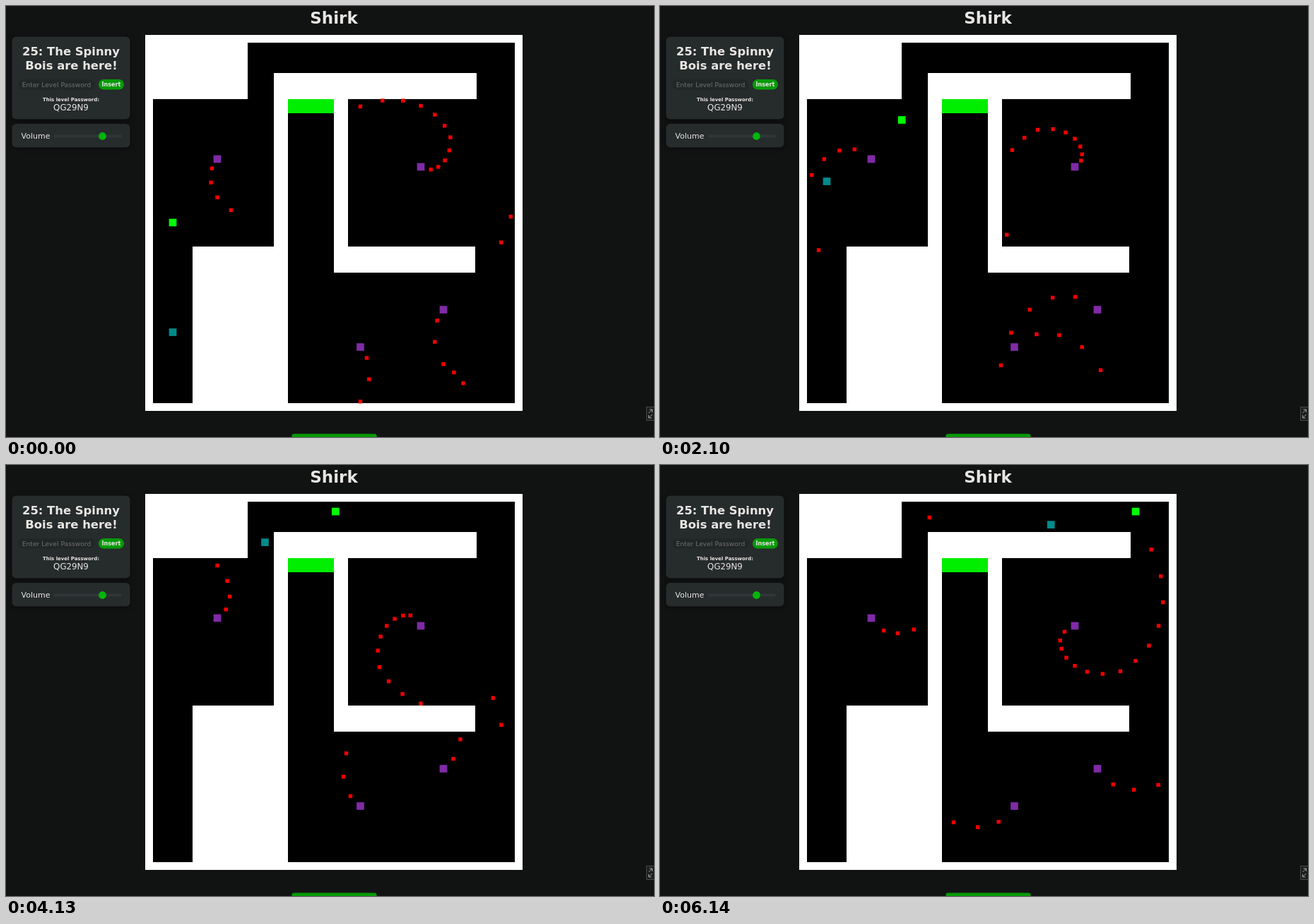
These frames come from a looping animation (917 px wide and 611 px high, 6.21 s). An HTML page with a canvas:

```html
<!DOCTYPE html>
<html lang="en">
<head>
<meta charset="utf-8">
<title>Shirk</title>
<style>
  html, body { margin: 0; width: 100%; height: 100%; overflow: hidden; background: #111313; }
  svg, canvas { position: absolute; left: 0; top: 0; }
  text { font-family: "DejaVu Sans", sans-serif; fill: #e8e6e3; text-anchor: middle; }
  .b { font-weight: bold; }
  .panel { fill: #262b2c; filter: drop-shadow(0 1px 3px #0008); }
</style>
</head>
<body>
<svg width="917" height="611">
  <text class="b" x="464" y="25" font-size="23">Shirk</text>

  <rect class="panel" x="8.5" y="43.5" width="167" height="117" rx="6"/>
  <text class="b" x="92" y="70" font-size="16.4">25: The Spinny</text>
  <text class="b" x="92.5" y="90" font-size="16.4">Bois are here!</text>
  <rect x="17" y="104" width="109" height="14.5" rx="7" fill="#212627"/>
  <text x="71.5" y="114.5" font-size="9.2" style="fill:#71716d">Enter Level Password</text>
  <rect x="131" y="104" width="36" height="14.5" rx="7.2" fill="#069a06"/>
  <text class="b" x="149" y="114.3" font-size="8.1">Insert</text>
  <text class="b" x="92" y="135" font-size="6.95">This level Password:</text>
  <text x="92" y="147.5" font-size="11.8">QG29N9</text>

  <rect class="panel" x="8.5" y="167" width="167" height="33.5" rx="6"/>
  <text x="42" y="188" font-size="11">Volume</text>
  <rect x="67" y="182.5" width="97" height="4" rx="2" fill="#303637"/>
  <circle cx="136.5" cy="184.5" r="5.4" fill="#00b50a"/>

  <rect x="404.5" y="606.5" width="120" height="12" rx="3" fill="#069a06"/>
  <rect x="906.5" y="568.5" width="14" height="19" fill="#1b1d1d" stroke="#4a4d4d"/>
  <path d="M914.5 576v-4h-4m4 0l-5 5M909.500 580v4h4m-4 0l5-5" fill="none" stroke="#a5a5a2"/>
</svg>
<canvas id="stage" width="917" height="611"></canvas>
<script>
const ctx = document.getElementById('stage').getContext('2d');
const STEP = 70, LOOP = 6210, LAST = 6140, LAST_TICK = 88;

// Distances in pixels, times in ticks, speeds in pixels per tick
const WALK = 7.13, SLOW = 4.46, FAST = 6.69;
const MUZZLE = 8.5, MARGIN = 1.8, FIRST_SHOT = -18.5, TURN = 15;

// Rectangles as left, top, right, bottom
const frame = [197, 41, 731, 574], room = [208, 52, 720, 563];
const goal = [399, 132, 464, 152];
const walls = [
  [208, 52, 342, 132], [379, 95, 666, 132], [379, 132, 399, 563],
  [264, 341, 399, 563], [464, 132, 484, 378], [464, 341, 664, 378]
];

const spinner = (x, y, angle, speed, turn = TURN, start = -1.2, period = 4.541) =>
  ({ x, y, angle, speed, turn, start, period });
const spinners = [
  spinner(299, 217, 120, SLOW),
  spinner(587, 228, 15, FAST, TURN, -.88, 1.541),
  spinner(619, 430.5, 120, FAST),
  spinner(501.5, 483.5, 60, FAST, -TURN)
];

// Spans during which the right and up keys are held
const walkers = [
  { x: 236, y: 462.5, color: '#008b8b',
    right: [[33.7, 39], [41.8, 54.8], [61.8, 88]], up: [[0, 36.8], [43.3, 50], [53, 62.5]] },
  { x: 236, y: 307, color: '#00ff00',
    right: [[13.4, 28.3], [30, 32.8], [44.4, 88]], up: [[0, 16], [22, 26.4], [31.9, 45.3]] }
];

const walked = (spans, n) => WALK * spans.reduce(
  (sum, [from, to]) => sum + Math.max(0, Math.min(n, to) - from), 0);

const inside = ([x, y], [l, t, r, b], pad) =>
  x > l - pad && x < r + pad && y > t - pad && y < b + pad;

const blocked = p => !inside(p, room, -MARGIN) || walls.some(w => inside(p, w, MARGIN));

// Shots leave from the edge of the square spinner and fly straight into a wall
function makeShot(s, degrees, birth) {
  const a = degrees * Math.PI / 180, dx = Math.cos(a), dy = Math.sin(a);
  const edge = MUZZLE / Math.max(Math.abs(dx), Math.abs(dy));
  const at = n => {
    const r = edge + s.speed * (n - birth);
    return [s.x + r * dx, s.y + r * dy];
  };
  let death = birth;
  while (!blocked(at(death))) death += .1;
  return { at, birth, death };
}

// Three strays are already in flight when the loop begins
const shots = [
  makeShot(spinners[1], 29, -20.3), makeShot(spinners[1], 43.3, -21.6),
  makeShot(spinners[3], 15.2, -19.2)
];
for (const s of spinners) {
  let k = Math.ceil((FIRST_SHOT - s.start) / s.period);
  for (let birth; (birth = s.start + k * s.period) <= LAST_TICK; k++) {
    shots.push(makeShot(s, s.angle + k * s.turn, birth));
  }
}

function box([l, t, r, b], color) {
  ctx.fillStyle = color;
  ctx.fillRect(l, t, r - l, b - t);
}

const square = (x, y, size, color) =>
  box([x - size / 2, y - size / 2, x + size / 2, y + size / 2], color);

function draw() {
  const t = performance.now() % LOOP;
  const n = t >= LAST ? LAST_TICK : Math.floor(t / STEP);
  box(frame, '#fff');
  box(room, '#000');
  for (const w of walls) box(w, '#fff');
  box(goal, '#00ee00');
  for (const s of spinners) square(s.x, s.y, 10.7, '#7f2aa6');
  for (const s of shots) {
    if (n >= s.birth && n < s.death) square(...s.at(n), 5.4, '#f80000');
  }
  for (const w of walkers) {
    square(w.x + walked(w.right, n), w.y - walked(w.up, n), 10.7, w.color);
  }
  requestAnimationFrame(draw);
}
draw();
</script>
</body>
</html>
```
